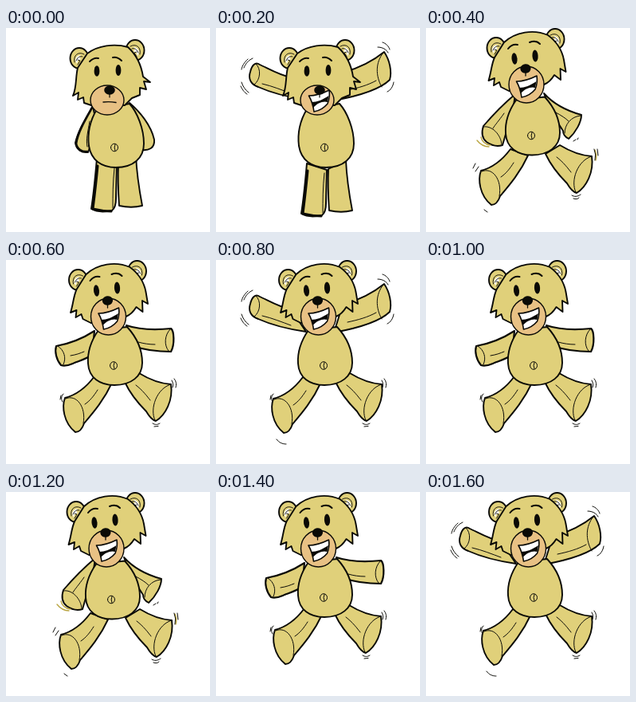
Write an HTML page that moves like this. It is 256 by 256 pixels and loops after 1.8 s.

```html
<!DOCTYPE html>
<html lang="en">
<head>
<meta charset="utf-8">
<title>Jumping bear</title>
<style>
  html, body { margin: 0; width: 100%; height: 100%; overflow: hidden; background: #fff; }
  svg { display: block; width: 100vw; height: 100vh; stroke-linecap: round; stroke-linejoin: round; }
</style>
</head>
<body>
<svg id="stage" viewBox="0 0 256 256"></svg>
<script>
const FUR = '#e0d07a', TAN = '#e8c184', INK = '#0a0a06', GOLD = '#b9a43e';
const STEP = 200;

const shape = (d, fill = FUR, w = 1.9) =>
  `<path d="${d}" fill="${fill}" stroke="${INK}" stroke-width="${w}"/>`;
const line = (d, w = 1) => shape(d, 'none', w);
const flat = (d, fill) => `<path d="${d}" fill="${fill}"/>`;
const oval = (x, y, rx, ry, turn = 0, fill = INK) =>
  `<ellipse cx="${x}" cy="${y}" rx="${rx}" ry="${ry}" fill="${fill}" transform="rotate(${turn} ${x} ${y})"/>`;
const shift = (x, y, art) => `<g transform="translate(${x} ${y})">${art}</g>`;

const ear = (x, y, side) => shift(x, y, `<g transform="scale(${side} 1)">` +
  `<ellipse rx="11.5" ry="13" fill="${FUR}" stroke="${INK}" stroke-width="1.9"/>` +
  flat('M-5 3 C-5 -1 -2 -4 2 -4 L0 -1 L2 1 L-2 3 L-3 7 Z', '#fff') +
  line('M-6 5 C-8 -4 -1 -9 6 -5 M-4 3 C-2 -2 1 -3 4 -2 M-2 2 L1 3 L-2 8', 0.9) + '</g>');

const button = (x, y) => line(
  `M${x - 4.5} ${y} a4.5 4.8 0 1 0 9 0 a4.5 4.8 0 1 0 -9 0 M${x + 1} ${y - 4} q-2 4 0 8`, 1);

const muzzle = (x, y, rx, ry) =>
  `<ellipse cx="${x}" cy="${y}" rx="${rx}" ry="${ry}" fill="${TAN}" stroke="${INK}" stroke-width="1.4"/>`;

const openMouth =
  shape('M113.500 67 C122 67 131 64 139 60 C140 66 139 72 137 77 C132 83 126 86 120 87 C119 80 117 73 113.500 67 Z', '#fff', 1.6) +
  flat('M117 75 C124 75 131 72 138.500 67 L137 75 C132 73 124 76 119 82 Z', INK);

// Head while in the air.
const airHead =
  ear(88, 25, 1) + ear(162, 14, -1) +
  shape('M98 18 C112 5 135 1 153 9 C164 17 171 29 173 40 L175.500 55 L168.500 51 L169 65 L161 59 C158 64 153 69 148 71 L104 79 L94 74 L92 68 L85 72 L86 63 L78.500 66 C82 55 82 46 86 37 Z') +
  muzzle(126, 71, 22, 23) +
  oval(111, 38.5, 3.5, 7.2, -6) + oval(137, 35, 3.6, 7.4, -4) +
  line('M103 26 C106 22 110 20 115 21 M130 18 C135 16 140 17 143 20', 2) +
  openMouth + oval(125, 51, 6.6, 5.8, -8) + line('M125 56 L125 60', 1.3);

// Head while on the ground.
const groundHead = mouth =>
  ear(92, 38, 1) + ear(162, 28, -1) +
  shape('M102 32 C115 22 136 19 153 24 C164 34 170 48 172 61 L181 68 L173 67 L176 77 L168 75 L168 84 L158 88 L149 97 L107 97 L98 94 L97 87 L90 90 L91 81 L84 85 C89 74 87 62 90 50 Z') +
  muzzle(127, 90.5, 21, 18.5) +
  oval(114, 54, 3.4, 6.8) + oval(141, 53, 3.4, 7) +
  line('M105 42 C108 39 112 37 116 38 M134 37 C138 36 142 38 145 41', 2) +
  mouth + oval(130, 78, 6.8, 5.8) + line('M130 83 L130 87', 1.2);

const calmMouth = line('M122 93 Q130 92 138 93.500', 1.4);

const airBody = shape('M116 88 C107 101 102 116 103 130 C104 148 118 157 136 157 C157 157 171 146 171 129 C171 112 163 96 152 84 Z') +
  button(135, 132.5);

const groundBody =
  shape('M114 102 C105 117 102 132 104 148 C107 166 120 175 138 175 C160 175 173 163 173 145 C173 127 165 106 155 95 Z') +
  button(136, 150);

const groundLegs =
  shape('M114 164 C112 187 110 208 107 227 C114 231 124 231 133 229 C137 226 138 221 138 214 L139 172 Z', FUR, 2) +
  shape('M141 171 C140 190 141 208 142 223 C151 225 163 225 171 223 C167 202 164 183 163 160 Z') +
  line('M115 173 C113 195 111 211 109 227 C117 229 126 230 132 230', 3) +
  line('M136 176 C134 194 134 211 134 226');

const armsRest =
  shape('M109 98 C99 115 90 130 87 144 C88 153 95 157 103 156 L114 123 Z') +
  shape('M155 94 C168 105 182 122 186 140 C187 151 179 154 170 153 L160 120 Z') +
  line('M108 100 C99 116 90 131 88 145 C89 152 96 156 102 155', 2.7) +
  line('M105 117 C103 129 100 140 102 149');

const armsUp =
  shape('M94 62 C79 59 66 51 55 46 C49 42 45 47 43 55 C40 64 44 71 53 74 C71 82 92 87 113 90 Z') +
  line('M50 45 C57 51 56 65 48 71 M58 70 C71 73 83 78 94 82') +
  shape('M159 56 C177 51 195 43 211 30 C218 40 221 55 218 65 C208 75 186 84 148 91 Z') +
  line('M210 31 C200 43 200 60 208 74 M165 78 C179 75 190 72 201 66') +
  line('M46 38 C40 41 37 45 35 50 M40 39 C35 44 33 47 32 52 M32 68 C34 74 37 78 41 81 M31 73 C34 79 36 81 39 83 M203 24 C209 24 214 27 216 31 M209 18 C213 19 217 23 218 27 M223 68 C222 74 219 78 215 80');

const armsMid =
  shape('M111 89 C97 98 80 105 63 108 C61 115 63 125 69 132 C76 134 81 131 86 129 C94 126 101 124 108 119 Z', FUR, 2.2) +
  line('M65 108 C73 113 76 123 72 131 M81 120 C88 119 93 117 98 115') +
  shape('M151 82 C166 87 187 88 207 86 C211 89 212 106 207 115 C193 115 174 113 160 108 Z', FUR, 2.2) +
  line('M206 87 C199 94 198 107 204 114 M166 103 C173 105 180 106 187 106');

const armsLow =
  shape('M112 83 C100 93 84 109 72 123 C69 132 70 138 76 143 C83 148 90 149 96 147 C99 137 104 118 109 104 Z') +
  line('M72 124 C83 122 94 134 95 146 M98 107 C91 117 87 121 84 126') +
  shape('M148 82 C157 92 173 103 195 109 C195 118 188 131 179 139 C175 137 172 133 172 129 C166 120 160 111 155 100 Z') +
  line('M194 110 C182 111 174 121 174 132 M163 106 C170 110 175 113 179 117') +
  `<path d="M69 137 C70 142 74 146 81 147 M64 141 C68 146 73 149 79 149 M212 153 Q215 159 213 166" fill="none" stroke="${GOLD}" stroke-width="1.3"/>` +
  line('M185 142 L188 140 M190 140 L191 138');

const leftLeg =
  shape('M111 146 C102 158 90 169 74 173 C70 184 72 204 87 216 C92 216 96 211 98 205 C109 192 123 176 133 154 Z') +
  line('M75 174 C88 168 101 184 97 205 M115 163 C110 171 105 177 99 181');

const rightLeg =
  shape('M149 153 C155 166 165 179 176 190 C180 197 184 201 188 202 C200 195 210 176 207 156 C194 155 180 150 167 142 Z') +
  line('M187 201 C180 187 189 161 207 156 M163 157 C172 164 177 171 181 176');

const footMarks = line('M72 168 C69 171 69 175 71 178 M69 170 L68 175 M208 151 C210 154 210 157 209 160 M211 149 C214 153 214 156 213 160 M184 205 C187 207 190 207 193 205 M186 209 L191 208.500');
const landMark = line('M76 225 C79 229 83 231 88 231');
const lowMarks = line('M62 170 L59 176 M66 174 L62 180 M73 228 L77 231 M211 152 Q214 159 212 166 M215 152 L216 160 M183 210 C186 212 190 212 194 209 M185 214 C188 215 190 215 192 213');

const airHeadRight = shift(2.5, 0, airHead);

const poses = {
  stand: armsRest + groundLegs + groundBody + groundHead(calmMouth),
  ready: armsUp + shift(0, 6, groundLegs) + groundBody + groundHead(shift(3, 18, openMouth)),
  low: armsLow + shift(-5, 6, leftLeg) + shift(1, 5, rightLeg) + lowMarks + shift(-3, 2.5, airBody) + airHead,
  mid: armsMid + leftLeg + rightLeg + footMarks + airBody + airHeadRight,
  high: armsUp + shift(-2, 1, leftLeg) + shift(1, 0, rightLeg) + footMarks + landMark + airBody + airHeadRight
};
const order = ['stand', 'ready', 'low', 'mid', 'high', 'mid', 'low', 'mid', 'high'];

const stage = document.getElementById('stage');
stage.innerHTML = Object.entries(poses)
  .map(([name, art]) => `<g data-pose="${name}" display="none">${art}</g>`).join('');
const layers = [...stage.children];

const start = performance.now();
function draw(now) {
  const step = Math.floor(Math.max(0, now - start) / STEP) % order.length;
  for (const layer of layers)
    layer.setAttribute('display', layer.dataset.pose === order[step] ? 'inline' : 'none');
  requestAnimationFrame(draw);
}
draw(start);
</script>
</body>
</html>
```
